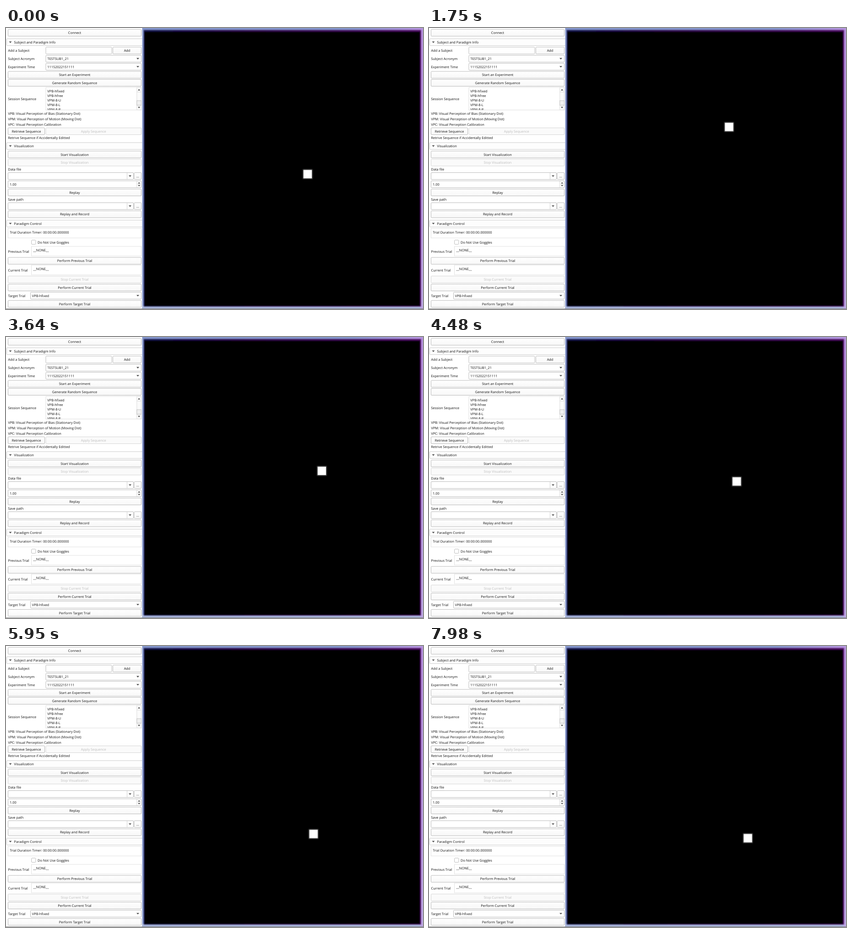
An HTML page for the animation above (8 s loop, 911 by 615 pixels).

```html
<!DOCTYPE html>
<html lang="en">
<head>
<meta charset="utf-8">
<title>Moving dot trial</title>
<style>
  html, body { margin: 0; width: 100%; height: 100%; overflow: hidden; background: #fff; }
  svg { display: block; width: 911px; height: 615px; }
  text { font: 7.4px "Open Sans", "Noto Sans", sans-serif; fill: #111; text-rendering: geometricPrecision; white-space: pre; }
  .off { fill: #bdbdbd; }
  .mid { text-anchor: middle; }
</style>
</head>
<body>
<svg viewBox="0 0 911 615">
  <defs>
    <linearGradient id="rim">
      <stop offset="0" stop-color="#8496cc"/>
      <stop offset=".75" stop-color="#8496cc"/>
      <stop offset="1" stop-color="#b795e0"/>
    </linearGradient>
    <linearGradient id="side" x2="0" y2="1">
      <stop offset="0" stop-color="#b48fdc"/>
      <stop offset="1" stop-color="#bda8e4"/>
    </linearGradient>
    <linearGradient id="edge">
      <stop offset="0" stop-color="#15164a"/>
      <stop offset=".3" stop-color="#2c0a48"/>
      <stop offset="1" stop-color="#4c0860"/>
    </linearGradient>
    <linearGradient id="face" x2="0" y2="1">
      <stop offset="0" stop-color="#fff"/>
      <stop offset="1" stop-color="#f7f7f7"/>
    </linearGradient>
    <filter id="soft" x="-10%" y="-10%" width="120%" height="120%"><feGaussianBlur stdDeviation=".8"/></filter>
    <clipPath id="listClip"><rect x="87" y="130" width="198" height="49.3"/></clipPath>
  </defs>
  <g id="panel"></g>
  <g id="view">
    <rect x="297.5" width="613.5" height="615" fill="url(#rim)"/>
    <rect x="297.5" y="608" width="613.5" height="7" fill="#a9b6dc"/>
    <rect x="905" y="4" width="6" height="611" fill="url(#side)"/>
    <g filter="url(#soft)">
      <rect x="301" y="4.5" width="605.5" height="605" fill="url(#edge)"/>
      <rect x="302.5" y="8" width="602" height="600.5" fill="#000"/>
    </g>
    <g id="dot">
      <rect x="-10.3" y="-10.3" width="20.6" height="20.6" fill="#777" filter="url(#soft)"/>
      <rect x="-9" y="-9" width="18" height="18" fill="#fff"/>
    </g>
  </g>
  <rect y="614" width="911" height="1" fill="#777"/>
</svg>
<script>
const NS = "http://www.w3.org/2000/svg";
const panel = document.getElementById("panel");
const dot = document.getElementById("dot");

function add(tag, attrs, text) {
  const el = document.createElementNS(NS, tag);
  for (const key in attrs) el.setAttribute(key, attrs[key]);
  if (text) el.textContent = text;
  panel.appendChild(el);
  return el;
}

// Every vertical position is the middle of its row.
const label = (x, y, text, cls = "") => add("text", { x, y: y + 2.7, class: cls }, text);
const box = (x1, x2, y, h = 15, stroke = "#b4b4b4", fill = "#fff", rx = 1.5) =>
  add("rect", { x: x1, y: y - h / 2, width: x2 - x1, height: h, rx, fill, stroke, "stroke-width": .9 });
const arrow = (x, y, dir = 1, w = 3) =>
  add("path", { d: `M${x - w} ${y - dir * 1.6}h${2 * w}l${-w} ${dir * 3.4}z`, fill: "#4c4c4c" });
const line = (d, stroke = "#c4c4c4") => add("path", { d, stroke, fill: "none", "stroke-width": .8 });

function button(y, text, x1 = 4.5, x2 = 295.5, off = false) {
  box(x1, x2, y, 15, off ? "#d2d2d2" : "#b4b4b4", off ? "#fafafa" : "url(#face)");
  label((x1 + x2) / 2, y, text, off ? "mid off" : "mid");
}
function header(y, text) {
  box(1.5, 299, y, 15, "#c8c8c8", "#fdfdfd", 1);
  arrow(9.5, y);
  label(17.5, y, text);
}
function combo(x, y, text) {
  box(x, 295.5, y);
  arrow(288, y);
  label(x + 3.3, y, text);
}
function pathField(y) {
  box(4.5, 278.5, y);
  line(`M264.5 ${y - 7}v14`);
  arrow(271, y);
  button(y, "...", 280, 295.5);
}
function readout(x, y, h, text, textY) {
  box(x, 295.5, y, h, "#dedede", "#fff", 0);
  label(x + 3.7, textY, text);
}

add("rect", { width: 298, height: 615, fill: "#fff" });
button(10.5, "Connect");

header(31, "Subject and Paradigm Info");
label(4.5, 49.5, "Add a Subject");
box(87, 231, 49.3);
button(49.3, "Add", 233.5, 295.5);
label(4.5, 67.3, "Subject Acronym");
combo(87, 67.2, "TESTSUB1_21");
label(4.5, 85, "Experiment Time");
combo(87, 84.8, "11152022151111");
button(102.5, "Start an Experiment");
button(120, "Generate Random Sequence");

label(4.5, 155, "Session Sequence");
box(87, 295.5, 154.7, 49.5, "#dcdcdc", "#fff", 0);
const list = add("g", { "clip-path": "url(#listClip)" });
["VPB-hfixed", "VPB-hfree", "VPM-8-U", "VPM-8-L", "VPM-8-R"].forEach((name, i) =>
  list.appendChild(label(90.3, 138.5 + i * 9.85, name)));
box(285.8, 295.5, 154.7, 49.5, "#d8d8d8", "#fafafa", 0);
box(285.8, 295.5, 164, 10, "#bcbcbc", "#f0f0f0", 0);
line("M285.8 140h9.7M285.8 169.5h9.7", "#d0d0d0");
arrow(290.6, 135.2, -1, 2.5);
arrow(290.6, 174, 1, 2.5);

label(4.5, 187, "VPB: Visual Perception of Bias (Stationary Dot)");
label(4.5, 199, "VPM: Visual Perception of Motion (Moving Dot)");
label(4.5, 211, "VPC: Visual Perception Calibration");
button(226, "Retrieve Sequence", 4.5, 84.5);
button(226, "Apply Sequence", 87, 295.5, true);
label(4.5, 240.7, "Retrive Sequence if Accidentally Editted");

header(258.3, "Visualization");
button(276.8, "Start Visualization");
button(294.5, "Stop Visualization", 4.5, 295.5, true);
label(4.5, 309.5, "Data file");
pathField(324);
box(4.5, 295.5, 342);
label(8, 342.2, "1.00");
line("M286 335v14");
arrow(290.7, 339, -1, 2.5);
arrow(290.7, 345, 1, 2.5);
button(360, "Replay");
label(4.5, 375.3, "Save path");
pathField(389.8);
button(407.7, "Replay and Record");

header(428, "Paradigm Control");
readout(4.5, 449, 21, "Trial Duration Timer: 00:00:00.000000", 447);
box(55.7, 65, 468.8, 9.3);
label(69, 469.3, "Do Not Use Goggles");
label(4.5, 489.3, "Previous Trial");
readout(55.5, 488.5, 21, "__NONE__", 486.7);
button(509.6, "Perform Previous Trial");
label(4.5, 530.3, "Current Trial");
readout(55.5, 529.5, 21, "__NONE__", 527.7);
button(550.3, "Stop Current Trial", 4.5, 295.5, true);
button(568, "Perform Current Trial");
label(4.5, 586, "Target Trial");
combo(53.5, 585.8, "VPB-hfixed");
button(603.8, "Perform Target Trial");

const LOOP = 8000, STEP = 70;
// time, x, y
const path = [
  [0, 659, 319.8], [700, 652.2, 276], [1750, 655.6, 216.6], [3640, 690, 293],
  [5250, 656.7, 341.8], [6720, 691.8, 473], [7980, 696.6, 420.6]
];

const slope = (i, k) => (path[i + 1][k] - path[i][k]) / (path[i + 1][0] - path[i][0]);

// Tangents vanish at turning points, so the curve never overshoots.
function tangent(i, k) {
  if (i === 0) return slope(0, k);
  if (i === path.length - 1) return slope(i - 1, k);
  const a = slope(i - 1, k), b = slope(i, k);
  return a * b > 0 ? 2 * a * b / (a + b) : 0;
}

function along(t, k) {
  let i = 0;
  while (i < path.length - 2 && t >= path[i + 1][0]) i++;
  const [p, q] = [path[i], path[i + 1]], h = q[0] - p[0];
  const s = (t - p[0]) / h, r = 1 - s;
  return p[k] * (1 + 2 * s) * r * r + q[k] * s * s * (3 - 2 * s)
    + h * s * r * (tangent(i, k) * r - tangent(i + 1, k) * s);
}

function draw(ms) {
  const t = Math.floor((ms % LOOP) / STEP) * STEP;
  dot.setAttribute("transform", `translate(${along(t, 1).toFixed(2)} ${along(t, 2).toFixed(2)})`);
}

const start = performance.now();
function tick() {
  draw(performance.now() - start);
  requestAnimationFrame(tick);
}
tick();
</script>
</body>
</html>
```
